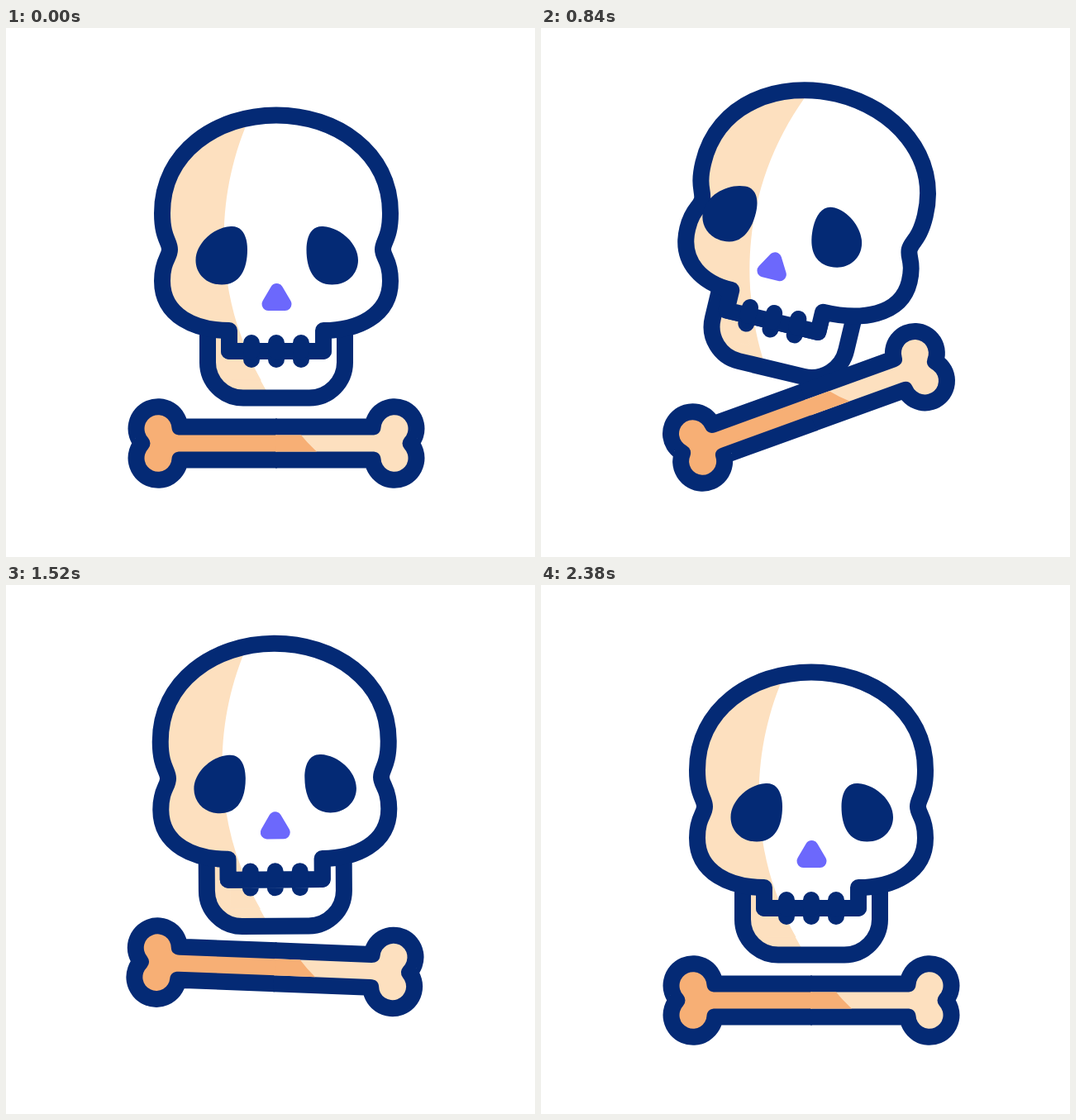
An HTML page for the animation above (3000 ms loop, 640 px wide and 640 px high).

```html
<!DOCTYPE html>
<html lang="en">
<head>
<meta charset="utf-8">
<title>Skull and bone</title>
<style>
  html, body { margin: 0; width: 100%; height: 100%; overflow: hidden; background: #fff; }
  svg { display: block; width: 100vw; height: 100vh; }
  .line { fill: none; stroke: #042a75; stroke-width: 20; stroke-linecap: round; stroke-linejoin: round; }
  .shade { fill: #fde0bf; }
  .white { fill: #fff; }
</style>
</head>
<body>
<svg viewBox="0 0 640 640">
  <defs>
    <path id="skull"/>
    <path id="jaw" d="M244 360V404A43 43 0 0 0 287 447.5H367A43 43 0 0 0 410 404V360"/>
    <path id="gap" d="M273 380L288 385C294 400 300 412 308 426H273Z"/>
    <path id="eye" d="M272 240C286 239 292 252 292 268C292 292 283 310.5 261 310.5C242 310.5 229.5 297 229.5 281C229.5 260 252 241 272 240Z"/>
    <path id="half" d="M1 -10H-116C-122 -10 -126 -12.5 -126.5 -18.5A16.5 16.5 0 1 0 -155 -6.5Q-150 0 -155 6.5A16.5 16.5 0 1 0 -126.5 18.5C-126 12.5 -122 10 -116 10H1"/>
    <clipPath id="inSkull"><use href="#skull"/></clipPath>
    <clipPath id="inJaw"><use href="#jaw"/></clipPath>
  </defs>

  <g id="head">
    <g class="jawMove">
      <use href="#jaw" class="white"/>
      <path class="shade" clip-path="url(#inJaw)" d="M230 340H274L280 360C288 385 300 415 320 447V460H230Z"/>
    </g>
    <g class="lowerMouth"><use href="#gap" class="white"/></g>
    <g class="upperMouth"><use href="#gap" class="shade" stroke="#fde0bf"/></g>
    <g class="lowerMouth">
      <path class="white" d="M270 355H384V391H270Z"/>
      <path class="line" d="M270 366V391H384V366M297 391V401M327 391V401M357 391V401"/>
    </g>
    <g class="jawMove"><use href="#jaw" class="line" style="stroke-linecap:butt"/></g>

    <use href="#skull" class="white"/>
    <path class="shade" clip-path="url(#inSkull)" d="M296 105C262 180 252 270 280 360L291 391H170V95H296Z"/>
    <use href="#skull" class="line"/>
    <g class="upperMouth"><path class="line" d="M297 381V391M327 381V391M357 381V391"/></g>
    <g id="face" fill="#042a75">
      <use href="#eye"/>
      <use href="#eye" transform="translate(655.5 0) scale(-1 1)"/>
      <path d="M327.5 317L317.5 334H337.5Z" fill="#6c68fc" stroke="#6c68fc" stroke-width="16" stroke-linejoin="round"/>
    </g>
  </g>

  <g id="bone">
    <g class="line" style="stroke-width:40;stroke-linecap:butt">
      <use href="#half"/>
      <use href="#half" transform="scale(-1 1)"/>
    </g>
    <use href="#half" class="shade" transform="scale(-1 1)"/>
    <g fill="#f7af75">
      <use href="#half"/>
      <path d="M0 -10H30Q38 0 49 10H0Z"/>
    </g>
  </g>
</svg>
<script>
const LOOP = 3000;

// Each track lists [time in ms, value]; values ease in and out between keys.
const tracks = {
  headX: [[0, 0], [520, 0], [840, -6], [1180, -2], [1520, -2], [1780, 0]],
  headY: [[0, 0], [370, 15], [700, -57], [1060, 24], [1430, -44], [1770, 12], [1970, -18], [2180, 0]],
  headTurn: [[0, 0], [460, -12], [830, 13.5], [1240, -4.2], [1800, 3.4], [2220, 0]],
  look: [[0, 0], [840, -27], [1560, 0]],
  open: [[0, 0], [120, 0], [440, 32], [740, 0], [860, 0], [1140, 32], [1480, 0]],
  boneX: [[0, 0], [420, -3], [1300, -3], [1750, 0]],
  boneY: [[0, 0], [400, 41], [740, -67], [1060, 36], [1460, -46], [1750, 9], [1960, -14], [2170, 5], [2380, 0]],
  boneTurn: [[0, 0], [450, 16], [820, -20], [1360, 5], [1820, -5], [2120, 1.5], [2380, 0]]
};

function valueAt(keys, t) {
  const next = keys.findIndex(key => key[0] > t);
  if (next < 0) return keys[keys.length - 1][1];
  const [t0, v0] = keys[next - 1], [t1, v1] = keys[next];
  const ease = (1 - Math.cos(Math.PI * (t - t0) / (t1 - t0))) / 2;
  return v0 + (v1 - v0) * ease;
}

function skullPath(shift) {
  const left = 270 + shift, right = 384 + shift;
  return `M${left} 366C${230 + shift / 2} 366 189 349 189 306C189 281 198 278 198 268
    C198 258 189 254 189 224C189 150 255 105.5 327 105.5C399 105.5 465 150 465 224
    C465 254 456 258 456 268C456 278 465 281 465 306
    C465 349 ${424 + shift / 2} 366 ${right} 366V391H${left}Z`;
}

function move(selector, x, y, turn = "") {
  for (const el of document.querySelectorAll(selector))
    el.setAttribute("transform", `translate(${x} ${y}) ${turn}`);
}

function draw(now) {
  const t = now % LOOP, pose = {};
  for (const name in tracks) pose[name] = valueAt(tracks[name], t);
  const mouth = pose.look * 0.45;

  document.getElementById("skull").setAttribute("d", skullPath(mouth));
  move("#head", pose.headX, pose.headY, `rotate(${pose.headTurn} 327 265)`);
  move("#face", pose.look, 0);
  move(".upperMouth", mouth, 0);
  move(".lowerMouth", mouth, pose.open);
  move(".jawMove", 0, pose.open);
  move("#bone", 327 + pose.boneX, 502.5 + pose.boneY, `rotate(${pose.boneTurn})`);
  requestAnimationFrame(tick);
}

const start = performance.now();
function tick() { draw(performance.now() - start); }
draw(0);
</script>
</body>
</html>
```
